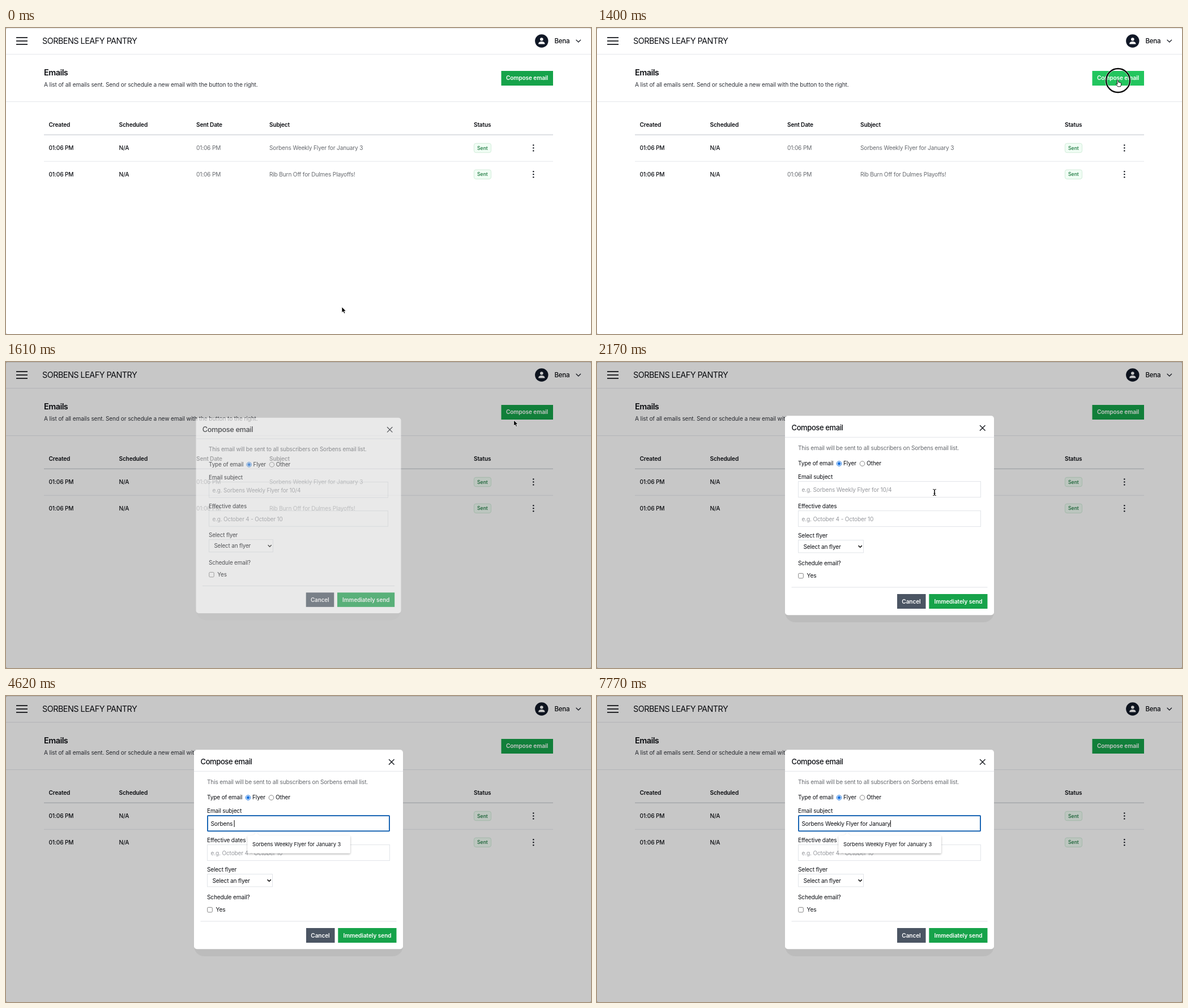
Animation, 1033 px wide and 542 px high, one loop 8000 ms. Source, as an HTML page:

```html
<!DOCTYPE html>
<html lang="en">
<head>
<meta charset="utf-8">
<title>Emails</title>
<style>
  html, body { margin: 0; width: 100%; height: 100%; overflow: hidden; background: #fff; }
  svg { display: block; width: 1033px; height: 542px; }
  text {
    font: 400 10.08px Inter, "Liberation Sans", sans-serif;
    font-optical-sizing: none;
    letter-spacing: -.015em;
    white-space: pre;
    fill: #0b0d12;
  }
  .brand { font-size: 14.4px; letter-spacing: -.036em; }
  .heading { font-size: 14.4px; font-weight: 600; letter-spacing: -.036em; }
  .dialog-title { font-size: 12.96px; font-weight: 500; letter-spacing: -.028em; }
  .user { font-size: 11.52px; font-weight: 500; letter-spacing: -.02em; }
  .medium { font-weight: 500; }
  .semi { font-weight: 600; }
  .muted { fill: #66696e; }
  .soft { fill: #30333a; letter-spacing: -.01em; }
  .hint { fill: #96989d; }
  .button { font-weight: 600; fill: #fff; text-anchor: middle; letter-spacing: -.008em; }
  .badge { font-size: 8.64px; font-weight: 500; letter-spacing: 0; fill: #15753a; }
  .suggestion { font-size: 9.36px; letter-spacing: -.006em; }
</style>
</head>
<body>
<svg id="stage" viewBox="0 0 1033 542" xmlns="http://www.w3.org/2000/svg"></svg>
<script>
const LOOP = 8000;
const TICK = 70;
const SHOP = "Sorbens";
const SUBJECT = `${SHOP} Weekly Flyer for January 3`;

const text = (x, y, content, cls = "") => `<text x="${x}" y="${y}" class="${cls}">${content}</text>`;
const rect = (x, y, w, h, attrs) => `<rect x="${x}" y="${y}" width="${w}" height="${h}" ${attrs}/>`;
const line = (x1, x2, y, color, width = 1) => `<path d="M${x1} ${y}H${x2}" stroke="${color}" stroke-width="${width}"/>`;
const circle = (x, y, r, attrs) => `<circle cx="${x}" cy="${y}" r="${r}" ${attrs}/>`;
const stroke = (d, color, width, attrs = "") =>
  `<path d="${d}" fill="none" stroke="${color}" stroke-width="${width}" stroke-linecap="round" stroke-linejoin="round" ${attrs}/>`;
const field = (x, y, w, h, attrs = "") => rect(x, y, w, h, `fill="#fff" stroke="#e2e5e9" ${attrs}`);

function emailRow(y, subject) {
  return text(75.5, y + 3.7, "01:06 PM", "medium") +
    text(199.5, y + 3.7, "N/A", "medium") +
    text(336, y + 3.7, "01:06 PM", "muted") +
    text(465, y + 3.7, subject, "muted") +
    rect(826.4, y - 8.2, 30.2, 16.4, 'rx="3.5" fill="#f0fdf4" stroke="#c8e8d2" stroke-width=".8"') +
    text(832, y + 3, "Sent", "badge") +
    [-5, 0, 5].map(d => circle(931.3, y + d, 1.25, 'fill="#1b1f27"')).join("");
}

const page = `
  ${rect(0, 0, 1033, 542, 'fill="#c4c4c4"')}
  ${rect(0, .5, 1033, 541.5, 'rx="3" fill="#fff"')}
  ${[17, 23, 29].map(y => line(18, 38, y, "#0b0d12", 1.7)).join("")}
  ${text(64, 28.2, `${SHOP.toUpperCase()} LEAFY PANTRY`, "brand")}
  ${circle(945.8, 23, 11.7, 'fill="#111827"')}
  ${circle(945.8, 20, 2.8, 'fill="#fff"')}
  <path d="M940.2 28.6v-.6c0-2.7 2.5-4 5.6-4s5.6 1.3 5.6 4v.6z" fill="#fff"/>
  ${text(968.5, 27.2, "Bena", "user")}
  ${stroke("M1007 21.2l3.8 3.8 3.8-3.8", "#20242c", 1.3)}
  ${line(0, 1033, 46.5, "#e5e7eb")}
  ${text(67, 83.6, "Emails", "heading")}
  ${text(67, 103.7, "A list of all emails sent. Send or schedule a new email with the button to the right.", "soft")}
  ${rect(874.5, 76, 91.5, 26, 'id="compose"')}
  ${text(920, 92.4, "Compose email", "button")}
  ${line(0, 1033, 130.5, "#e5e7eb")}
  ${[[75.5, "Created"], [199.5, "Scheduled"], [336, "Sent Date"], [465, "Subject"], [826, "Status"]]
    .map(([x, label]) => text(x, 175.2, label, "semi")).join("")}
  ${line(67, 966, 189.3, "#d3d6db", 1.4)}
  ${emailRow(212.5, SUBJECT)}
  ${line(67, 966, 236.2, "#e5e7eb")}
  ${emailRow(259.3, "Rib Burn Off for Dulmes Playoffs!")}`;

const dialog = `
  ${rect(332, 420, 369, 41, 'id="dialogShadow" rx="18" fill="#000" fill-opacity=".055"')}
  ${rect(332, 95.3, 369, 353, 'rx="5" fill="#fff"')}
  ${text(343.5, 121, "Compose email", "dialog-title")}
  ${stroke("M676.4 112.5l8.8 8.8m0-8.8l-8.8 8.8", "#15181e", 1.3)}
  ${line(332, 701, 133.3, "#e3e5e9")}
  ${text(355, 156, `This email will be sent to all subscribers on ${SHOP} email list.`, "muted")}
  ${text(355, 183.4, "Type of email")}
  ${circle(427.5, 180, 4.3, 'fill="#fff" stroke="#1672e0"')}${circle(427.5, 180, 2.7, 'fill="#1672e0"')}
  ${text(435, 183.4, "Flyer")}
  ${circle(468.5, 180, 4.3, 'fill="#fff" stroke="#767676" stroke-width=".9"')}
  ${text(476, 183.4, "Other")}
  ${text(355, 207, "Email subject")}
  ${field(355.5, 211.5, 322, 28)}
  ${rect(356, 212, 321, 27.3, 'id="focus" rx="1" fill="none" stroke="#1a66b4" stroke-width="2"')}
  <g id="hint">${text(361.5, 230, `e.g. ${SHOP} Weekly Flyer for 10/4`, "hint")}</g>
  <text id="typed" x="361.5" y="230"></text>
  ${rect(0, 220, 1, 12, 'id="caret" fill="#000"')}
  ${text(355, 258.9, "Effective dates")}
  ${field(355.5, 263.5, 322, 28)}
  ${text(361.5, 282, "e.g. October 4 - October 10", "hint")}
  ${text(355, 310.7, "Select flyer")}
  ${field(355.5, 315.5, 115, 22.3, 'id="select"')}
  ${text(364.5, 330.6, "Select an flyer")}
  ${stroke("M-2.7 325.6l2.7 2.7 2.7-2.7", "#111", 1.5, 'id="selectArrow"')}
  ${text(355, 360.4, "Schedule email?")}
  ${rect(355.7, 374.4, 8.6, 8.6, 'rx="1.7" fill="#fff" stroke="#767676" stroke-width=".9"')}
  ${text(370.5, 382.2, "Yes")}
  ${line(343.5, 689.5, 399, "#e0e2e6")}
  ${rect(530, 411, 50.5, 26, 'fill="#4b5563"')}
  ${text(555, 427.6, "Cancel", "button")}
  ${rect(586.3, 411, 103.2, 26, 'fill="#16a34a"')}
  ${text(638, 427.6, "Immediately send", "button")}
  <g id="popup">
    <g filter="url(#shadow)">
      ${rect(426.5, 247, 181.5, 31.5, 'rx="2" fill="#fff"')}
      <path d="M436 247.5l6-5 6 5z" fill="#fff"/>
    </g>
    ${text(435, 266, SUBJECT, "suggestion")}
  </g>`;

// Pointer shapes are drawn with the hot spot at 0,0.
const BEAM = "M-2.4-5.5Q0-5.5 0-4V4Q0 5.5-2.4 5.5M2.4-5.5Q0-5.5 0-4V4Q0 5.5 2.4 5.5M-1.2 1.8H1.2";
const pointers = `
  <g id="pointer">
    <g id="arrow"><path d="M0 0V10.3L2.4 8.1 4 11.8 5.9 11 4.3 7.4H7.4Z" fill="#000" stroke="#fff" stroke-width=".8"/></g>
    <g id="hand"><path d="M-1.6 1.2C-1.6-.2.4-.2.5 1.2L.8 4.4C1.5 3.6 2.5 3.9 2.6 4.8 3.3 4.2 4.2 4.5 4.3 5.3 5.1 4.9 5.8 5.4 5.8 6.3 5.8 8.6 5 9.6 4.6 11.8H-.5C-1.2 9.9-2.9 8.9-3.6 7.5-3.9 6.5-2.8 6-2 7L-1.1 8Z"
      fill="#fff" stroke="#000" stroke-width=".9" stroke-linejoin="round"/></g>
    <g id="beam">${stroke(BEAM, "#fff", 2)}${stroke(BEAM, "#000", 1)}</g>
  </g>
  <g id="ring">
    ${circle(0, 0, 21, 'fill="none" stroke="#fff" stroke-opacity=".6" stroke-width="4"')}
    ${circle(0, 0, 21, 'fill="none" stroke="#0a0a0a" stroke-width="2.3"')}
  </g>`;

document.getElementById("stage").innerHTML = `
  <defs><filter id="shadow" x="-10%" y="-40%" width="120%" height="190%">
    <feDropShadow dx="0" dy="1.5" stdDeviation="1.6" flood-color="#000" flood-opacity=".32"/>
  </filter></defs>
  ${page}
  ${rect(0, 0, 1033, 542, 'id="backdrop" fill="#000" fill-opacity=".22"')}
  <g id="dialog">${dialog}</g>
  ${pointers}`;

const ui = Object.fromEntries([...document.querySelectorAll("[id]")].map(el => [el.id, el]));
const show = (el, on) => el.setAttribute("display", on ? "inline" : "none");
const clamp = v => Math.max(0, Math.min(1, v));

// Pointer waypoints: time, x, y.
const PATH = [
  [0, 593, 494], [140, 520, 455], [280, 376, 320], [420, 540, 170], [560, 800, 60],
  [700, 936, 18], [840, 920, 92], [1540, 920, 92], [1750, 850, 125], [1960, 670, 205],
  [2170, 596, 231]
];

// Bursts of typing: first key, last key, number of keys, characters before the burst.
const BURSTS = [
  [3080, 3080, 1, 0], [3570, 4410, 6, 1], [4620, 4620, 1, 7], [4970, 5880, 8, 8],
  [6090, 6090, 1, 16], [6440, 7350, 10, 18], [7490, 7770, 4, 28]
];

function pointerAt(t) {
  const next = PATH.findIndex(p => p[0] > t);
  if (next < 0) return PATH[PATH.length - 1].slice(1);
  const a = PATH[next - 1], b = PATH[next];
  const u = (t - a[0]) / (b[0] - a[0]);
  return [1, 2].map(i => a[i] + (b[i] - a[i]) * u);
}

function typedLength(t) {
  let length = 0;
  for (const [from, to, keys, before] of BURSTS) {
    if (t < from) break;
    const gap = keys > 1 ? (to - from) / (keys - 1) : 1;
    length = before + Math.min(keys, 1 + Math.floor((t - from) / gap + .01));
  }
  return Math.min(length, SUBJECT.length - 2);
}

function render(time) {
  const t = Math.floor(time / TICK) * TICK;
  const clicking = t >= 1400 && t < 1540;
  const open = t >= 1540;
  const focused = t >= 2240;

  ui.compose.setAttribute("fill", clicking ? "#22c55e" : "#16a34a");
  show(ui.backdrop, open);
  show(ui.dialog, open);
  const eased = 1 - (1 - clamp((t - 1495) / 300)) ** 2;
  const scale = .95 + .05 * eased;
  ui.dialog.setAttribute("opacity", eased);
  ui.dialogShadow.setAttribute("opacity", eased ** 2);
  ui.dialog.setAttribute("transform", `translate(516.5 271.7) scale(${scale}) translate(-516.5 -271.7)`);

  // The select widens once its options have loaded.
  const selectWidth = t < 1610 ? 94 : 115;
  ui.select.setAttribute("width", selectWidth);
  ui.selectArrow.setAttribute("transform", `translate(${349.7 + selectWidth} 0)`);

  const length = typedLength(t);
  ui.typed.textContent = SUBJECT.slice(0, length);
  show(ui.hint, length === 0);
  show(ui.popup, length > 0);
  show(ui.focus, focused);
  show(ui.caret, focused && (t < 2800 || length > 0));
  ui.caret.setAttribute("x", 361.2 + (length ? ui.typed.getComputedTextLength() : 0));

  const [x, y] = pointerAt(t);
  const overField = open && x < 678 && y > 211;
  show(ui.pointer, length === 0);
  show(ui.arrow, !clicking && !overField);
  show(ui.hand, clicking);
  show(ui.beam, overField);
  ui.pointer.setAttribute("transform", `translate(${x} ${y})`);
  show(ui.ring, clicking || t === 2240);
  ui.ring.setAttribute("transform", `translate(${x} ${y + 1})`);
}

const start = performance.now();
function frame() {
  render((performance.now() - start) % LOOP);
  requestAnimationFrame(frame);
}
frame();
</script>
</body>
</html>
```
